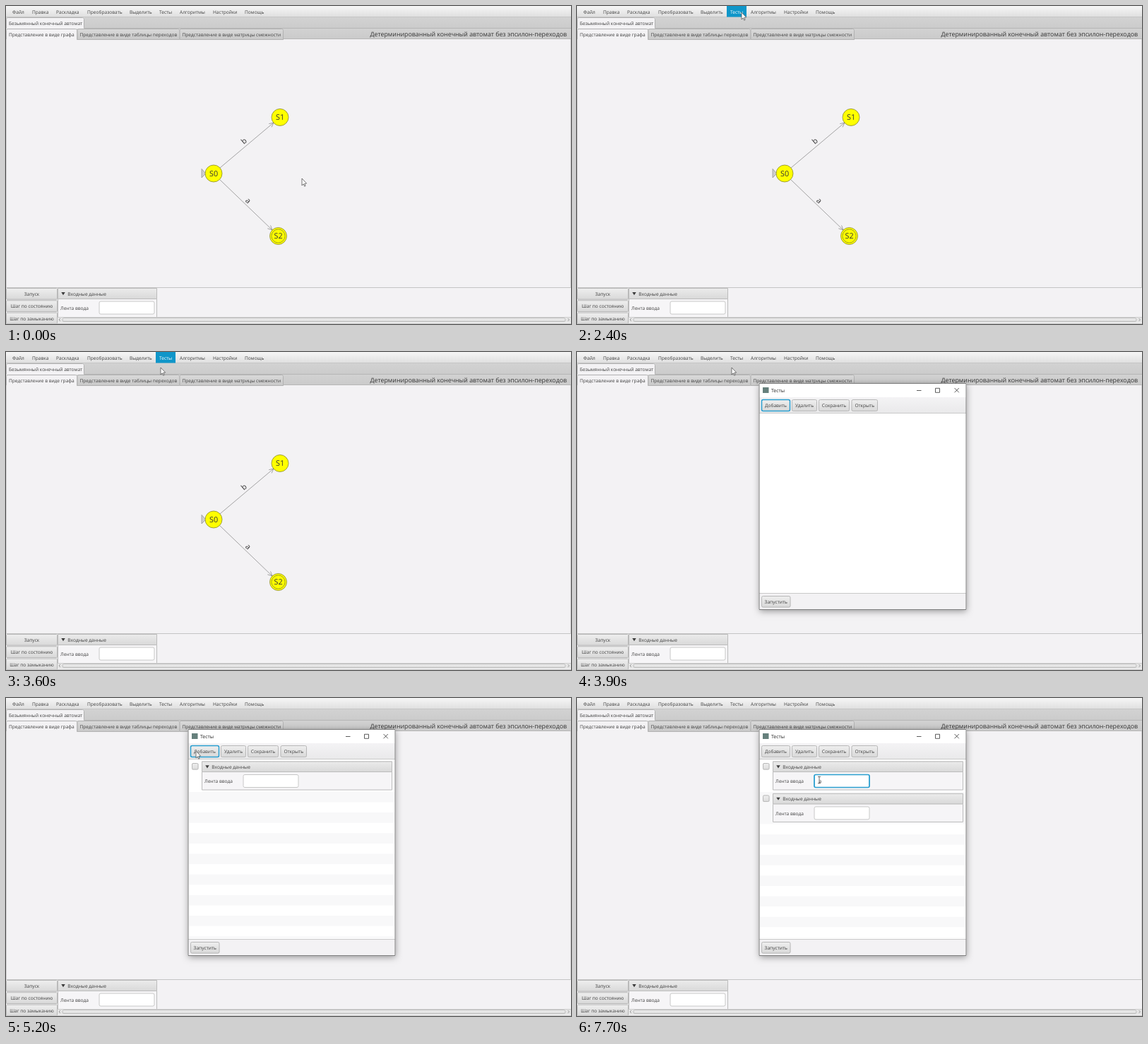
An HTML page with a canvas that plays this animation: 800 by 450 pixels, repeating every 8000 ms.

```html
<!DOCTYPE html>
<html lang="ru">
<head>
<meta charset="utf-8">
<title>Конечный автомат</title>
<style>
  html, body { margin: 0; width: 100%; height: 100%; overflow: hidden; background: #f3f2f4; }
  canvas { display: block; width: 800px; height: 450px; }
</style>
</head>
<body>
<canvas id="stage" width="800" height="450"></canvas>
<script>
const ctx = document.getElementById('stage').getContext('2d');
const LOOP = 8000, STEP = 100;
const FONT = '"Open Sans", "Noto Sans", sans-serif';
const SIZE = 6.6, INK = '#404040', LINE = '#bcbcbc', BLUE = '#0f96c9', FOCUS = '#2b9fd0';

// Pointer path: time, x, y
const PATH = [
  [300, 419, 244], [1100, 417, 238], [1400, 357, 178], [1600, 378, 149],
  [1700, 378, 149], [2300, 235, 10], [2400, 233, 9], [2800, 231, 9],
  [3400, 219, 22], [4300, 219, 22], [4500, 257, 51], [4600, 257, 51],
  [4900, 269, 75], [5700, 269, 75], [5800, 268, 74], [6000, 268, 74], [6500, 343, 116]
];

function pointerAt(t) {
  if (t <= PATH[0][0]) return PATH[0].slice(1);
  for (let i = 1; i < PATH.length; i++) {
    const [t0, x0, y0] = PATH[i - 1], [t1, x1, y1] = PATH[i];
    if (t <= t1) {
      const k = (t - t0) / (t1 - t0);
      return [x0 + (x1 - x0) * k, y0 + (y1 - y0) * k];
    }
  }
  return PATH[PATH.length - 1].slice(1);
}

function rect(x, y, w, h, fill) {
  ctx.fillStyle = fill;
  ctx.fillRect(x, y, w, h);
}

function grad(y, h, top, bottom) {
  const g = ctx.createLinearGradient(0, y, 0, y + h);
  g.addColorStop(0, top);
  g.addColorStop(1, bottom);
  return g;
}

function frame(x, y, w, h, color, radius = 0, width = 1) {
  ctx.beginPath();
  ctx.roundRect(x + 0.5, y + 0.5, w - 1, h - 1, radius);
  ctx.strokeStyle = color;
  ctx.lineWidth = width;
  ctx.stroke();
}

function box(x, y, w, h, fill, border, radius = 0) {
  ctx.beginPath();
  ctx.roundRect(x, y, w, h, radius);
  ctx.fillStyle = fill;
  ctx.fill();
  frame(x, y, w, h, border, radius);
}

function text(s, x, y, { size = SIZE, color = INK, align = 'left' } = {}) {
  ctx.font = `${size}px ${FONT}`;
  ctx.textAlign = align;
  ctx.fillStyle = color;
  ctx.fillText(s, x, y);
}

function poly(points, fill, stroke, width = 0.8) {
  ctx.beginPath();
  points.forEach(([x, y]) => ctx.lineTo(x, y));
  ctx.closePath();
  if (fill) { ctx.fillStyle = fill; ctx.fill(); }
  if (stroke) { ctx.strokeStyle = stroke; ctx.lineWidth = width; ctx.stroke(); }
}

function button(label, x, y, w, h, { focused = false, pressed = false, radius = 2 } = {}) {
  const fill = pressed ? grad(y, h, '#cccccc', '#d8d8d8') : grad(y, h, '#efefef', '#d8d8d8');
  box(x, y, w, h, fill, focused ? FOCUS : '#b8b8b8', radius);
  if (focused) frame(x, y, w, h, FOCUS, radius, 1.5);
  text(label, x + w / 2, y + h / 2 + 2.6, { align: 'center' });
}

function field(x, y, w, h, focused) {
  box(x, y, w, h, '#fff', focused ? FOCUS : '#c6c6c6', 2);
  if (focused) frame(x, y, w, h, FOCUS, 2, 1.6);
}

// Collapsible pane with one labelled input
function inputPane(x, y, w, h, head, focused) {
  box(x, y, w, h, '#f6f5f7', LINE);
  box(x, y, w, head, grad(y, head, '#ececec', '#d8d8d8'), LINE);
  const my = y + head / 2;
  poly([[x + 5.3, my - 2], [x + 10.7, my - 2], [x + 8, my + 2.2]], '#3c3c3c');
  text('Входные данные', x + 14.3, my + 2.6);
  text('Лента ввода', x + 4, y + 30.6);
  field(x + 58.5, y + 18.5, 79, 19, focused);
}

function node(label, x, y, final) {
  ctx.beginPath();
  ctx.arc(x, y, 12, 0, 7);
  ctx.fillStyle = '#ff0';
  ctx.fill();
  ctx.strokeStyle = '#77772f';
  ctx.lineWidth = 0.7;
  ctx.stroke();
  if (final) {
    ctx.beginPath();
    ctx.arc(x, y, 9.6, 0, 7);
    ctx.stroke();
  }
  text(label, x, y + 3.9, { size: 10.8, align: 'center', color: '#333' });
}

function edge(label, x0, y0, x1, y1, lx, ly) {
  const a = Math.atan2(y1 - y0, x1 - x0);
  ctx.strokeStyle = '#808080';
  ctx.lineWidth = 0.7;
  ctx.beginPath();
  ctx.moveTo(x0, y0);
  ctx.lineTo(x1, y1);
  for (const turn of [-0.45, 0.45]) {
    ctx.moveTo(x1, y1);
    ctx.lineTo(x1 - 7 * Math.cos(a + turn), y1 - 7 * Math.sin(a + turn));
  }
  ctx.stroke();
  ctx.save();
  ctx.translate(lx, ly);
  ctx.rotate(a);
  text(label, 0, 3.6, { size: 10.8, align: 'center', color: '#333' });
  ctx.restore();
}

function drawGraph() {
  edge('b', 303, 229, 379, 165, 337, 191);
  edge('a', 302.5, 245.5, 377, 317, 343, 275.5);
  poly([[277, 230.5], [277, 243], [283, 237]], '#cfcfcf', '#8a8a8a', 0.7);
  node('S0', 294, 237);
  node('S1', 388, 157.5);
  node('S2', 385.5, 325.5, true);
}

const MENU = [['Файл', 9], ['Правка', 37], ['Раскладка', 71], ['Преобразовать', 115],
  ['Выделить', 175], ['Тесты', 217], ['Алгоритмы', 246], ['Настройки', 293], ['Помощь', 338]];

function drawMenu(active) {
  rect(0, 0, 800, 16, grad(0, 16, '#f6f6f6', '#dedede'));
  rect(0, 15, 800, 1, '#c6c6c6');
  if (active) rect(212, 0, 28, 15.5, BLUE);
  for (const [s, x] of MENU) {
    text(s, x, 10.6, { color: active && s === 'Тесты' ? '#fff' : INK });
  }
}

function tab(label, x, y, w, selected) {
  box(x, y, w, 16, selected ? '#f3f2f4' : grad(y, 15, '#dadada', '#c9c9c9'), '#b2b2b2', [2, 2, 0, 0]);
  if (selected) rect(x + 1, y + 14, w - 2, 2, '#f3f2f4');
  text(label, x + 4, y + 10.8);
}

function drawTabs() {
  rect(0, 16, 800, 16, grad(16, 16, '#d2d2d2', '#cbcbcb'));
  rect(0, 31, 800, 1, '#b6b6b6');
  tab('Безымянный конечный автомат', 0, 16, 111, true);
  rect(0, 32, 800, 15, grad(32, 15, '#d2d2d2', '#cacaca'));
  rect(0, 46, 800, 1, '#b6b6b6');
  tab('Представление в виде графа', 0, 32, 101, true);
  tab('Представление в виде таблицы переходов', 100.5, 32, 145.5, false);
  tab('Представление в виде матрицы смежности', 245.5, 32, 147.5, false);
  text('Детерминированный конечный автомат без эпсилон-переходов', 794, 43.4,
    { size: 8.8, align: 'right', color: '#333' });
}

function drawFooter() {
  rect(0, 398, 800, 1, '#c4c4c4');
  ['Запуск', 'Шаг по состоянию', 'Шаг по замыканию'].forEach((s, i) =>
    button(s, 0, 399 + i * 17.3, 73, 16.6, { radius: 1 }));
  inputPane(73, 399, 141, 42, 16);
  rect(73, 440, 727, 8, '#e6e6e6');
  rect(73, 440, 727, 1, '#cdcdcd');
  box(79.5, 441, 713, 6, grad(441, 6, '#f0f0f0', '#dadada'), '#bdbdbd', 2);
  ctx.strokeStyle = '#8a8a8a';
  ctx.lineWidth = 0.8;
  ctx.beginPath();
  for (const [x, d] of [[76, 1], [796.5, -1]]) {
    ctx.moveTo(x + d, 442);
    ctx.lineTo(x - d, 444);
    ctx.lineTo(x + d, 446);
  }
  ctx.stroke();
  rect(0, 449, 800, 1, '#c4c4c4');
}

function withShadow(color, blur, dy, draw) {
  ctx.save();
  ctx.shadowColor = color;
  ctx.shadowBlur = blur;
  ctx.shadowOffsetY = dy;
  draw();
  ctx.restore();
}

function drawPopup(hover) {
  withShadow('rgba(0,0,0,.25)', 7, 4, () => rect(212, 16, 79, 19, '#f4f4f4'));
  frame(212, 16, 79, 19, '#c8c8c8');
  if (hover) rect(213, 18.5, 77, 14, BLUE);
  text('Выполнить тесты', 219, 28, { color: hover ? '#fff' : INK });
}

function drawRows(count) {
  rect(259, 87, 292, 254, '#fff');
  if (!count) return;
  const pitch = 14.6, top = 87.5 + count * 45.4;
  if (count > 1) rect(259, 133, 291, 45.4, '#f8f8f9');
  for (let i = count, y = top; y < 340; i++, y += pitch) {
    if (i % 2) rect(259, y, 291, Math.min(pitch, 340 - y), '#f8f8f9');
  }
}

function drawDialog(t) {
  const rows = t < 5100 ? 0 : t < 5500 ? 1 : 2;
  const typing = t >= 6800;
  withShadow('rgba(0,0,0,.38)', 9, 2, () => rect(257.5, 44, 294, 321, '#fff'));
  rect(258, 64, 293, 23, grad(64, 23, '#f4f3f5', '#e9e9ea'));
  drawRows(rows);
  rect(258, 86, 293, 1, '#c9c9c9');
  rect(258, 341, 293, 23, '#f3f2f4');
  rect(258, 341, 293, 1, '#c9c9c9');

  rect(263, 50, 8.5, 8, '#66807c');
  text('Тесты', 275, 57.4, { size: 6.9, color: '#222' });
  ctx.strokeStyle = '#333';
  ctx.lineWidth = 0.8;
  ctx.beginPath();
  ctx.moveTo(481, 54.5);
  ctx.lineTo(487.5, 54.5);
  ctx.rect(507.5, 51.3, 6, 6);
  ctx.moveTo(534.5, 51);
  ctx.lineTo(540.8, 57.3);
  ctx.moveTo(540.8, 51);
  ctx.lineTo(534.5, 57.3);
  ctx.stroke();

  button('Добавить', 261, 67, 41, 17, { focused: !typing, pressed: t === 5000 || t === 5400 });
  button('Удалить', 304, 67, 36, 17);
  button('Сохранить', 342, 67, 44, 17);
  button('Открыть', 388.5, 67, 37.5, 17);
  button('Запустить', 261, 345, 41.5, 16.5);

  for (let i = 0; i < rows; i++) {
    const y = 89.5 + i * 45.4;
    box(263, y + 2.5, 9.5, 9.5, grad(y + 2, 10, '#f0f0f0', '#dcdcdc'), '#b8b8b8', 1.5);
    inputPane(277, y, 270, 41, 15.5, typing && i === 0);
  }
  if (typing) {
    const typed = t >= 7200;
    if (typed) text('a', 342.6, 120.2);
    if (t < 7700) rect(typed ? 346.5 : 340.5, 111.5, 0.8, 12, '#333');
  }
  frame(257.5, 44, 294, 321, '#7d7d7d');
}

function drawPointer(t) {
  const [x, y] = pointerAt(t);
  ctx.save();
  ctx.translate(x, y);
  if (t > 4900 && x > 336 && y > 108) {
    ctx.strokeStyle = '#444';
    ctx.lineWidth = 0.8;
    ctx.beginPath();
    ctx.moveTo(0, -4.5);
    ctx.lineTo(0, 4.5);
    for (const end of [-4.7, 4.7]) {
      ctx.moveTo(-2, end);
      ctx.lineTo(2, end);
    }
    ctx.stroke();
  } else {
    poly([[0, 0], [0, 10], [2.2, 7.9], [3.7, 11.2], [5.1, 10.6], [3.7, 7.4], [6.6, 7.1]],
      '#fff', '#555', 0.8);
  }
  ctx.restore();
}

function render(t) {
  ctx.globalAlpha = 1;
  ctx.textBaseline = 'alphabetic';
  ctx.textRendering = 'geometricPrecision';
  rect(0, 0, 800, 450, '#f3f2f4');
  drawMenu(t >= 2200 && t < 3700);
  drawTabs();
  drawFooter();
  rect(0, 47, 1, 352, '#cfcfcf');
  rect(799, 47, 1, 352, '#cfcfcf');
  if (t < 3900) drawGraph();
  if (t >= 2800 && t < 3600) drawPopup(t >= 3200);
  if (t >= 3700) {
    ctx.globalAlpha = Math.min(1, (t - 3600) / 250);
    drawDialog(t);
    ctx.globalAlpha = 1;
  }
  drawPointer(t);
}

const start = performance.now();
function tick() {
  const t = (performance.now() - start) % LOOP;
  render(Math.floor(t / STEP) * STEP);
  requestAnimationFrame(tick);
}
tick();
</script>
</body>
</html>
```
